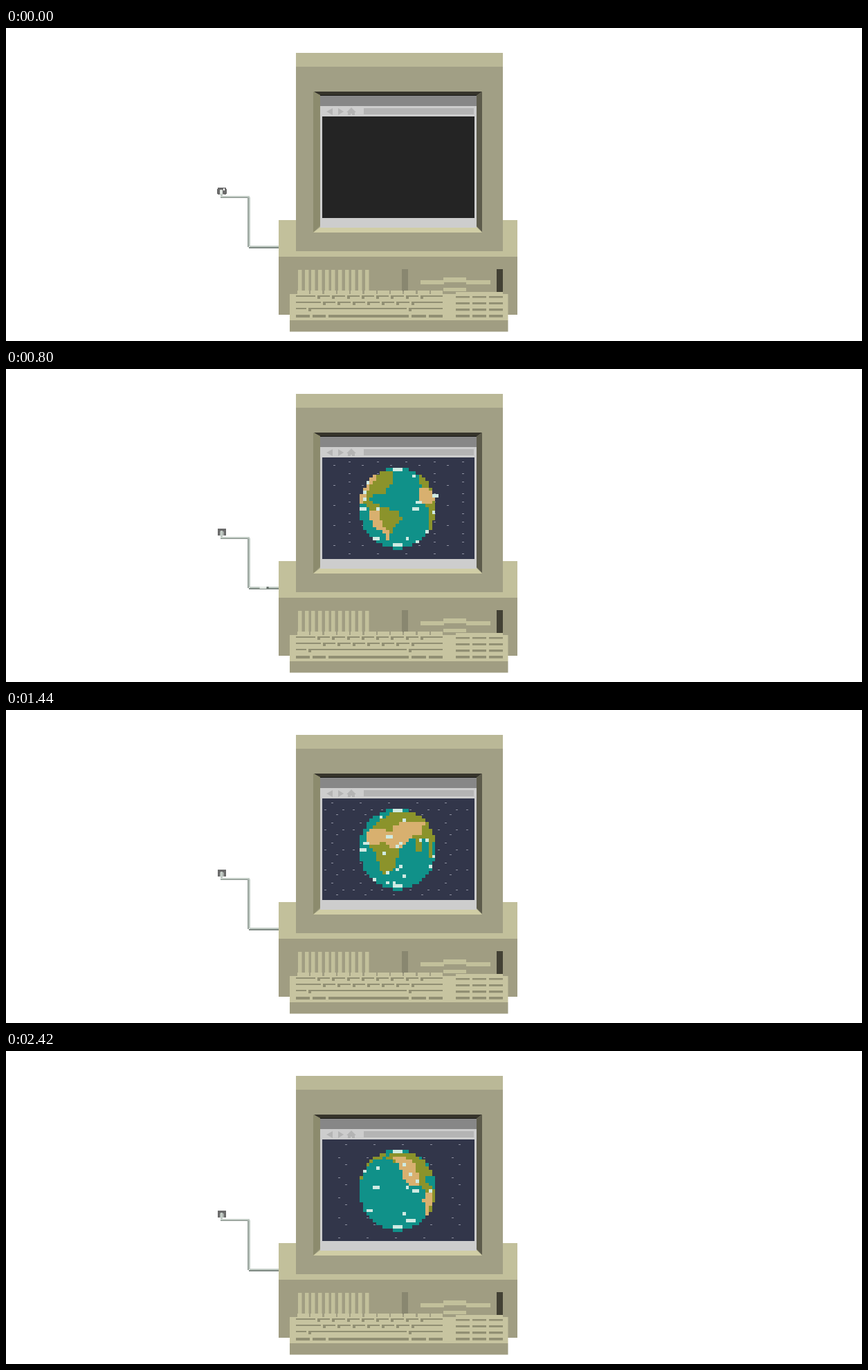
These frames come from a looping animation (1237 by 453 pixels, 2.44 s). An HTML page with a canvas:

```html
<!DOCTYPE html>
<html>
<head>
<meta charset="utf-8">
<style>
html, body { margin: 0; width: 100%; height: 100%; overflow: hidden; background: #fff; }
canvas { display: block; }
</style>
</head>
<body>
<canvas id="stage" width="1237" height="453"></canvas>
<script>
const ctx = document.getElementById('stage').getContext('2d');
const LOOP = 2440, LOADED = 911, TURN = 23, STEP = 650 / TURN;
const CELL = 4.75, GX = 511.2, GY = 138.3, RAD = Math.PI / 180;

// Corner-based rectangle and polygon
function box(color, x1, y1, x2, y2) {
  ctx.fillStyle = color;
  ctx.fillRect(x1, y1, x2 - x1, y2 - y1);
}
function poly(color, points) {
  ctx.fillStyle = color;
  ctx.fill(new Path2D('M' + points + 'z'));
}

// Coastlines as longitude in degrees and globe row
const coast = points => new Path2D('M' + points + 'z');
const oldLand = coast('-49,5 -36,4 -27,2.5 60,2 140,2 135,3.5 95,4 100,8 85,11 66,11 67,16 56,16 58,9.5 42,10 40,14 28,14 29,10 18,10 3,13 2,15.5 -9,20 -16,21 -30,21 -33,16 -40,13 -55,12 -60,9 -45,6');
const oldSand = coast('10,5 70,5 48,7 43,9 30,9 18,10 12,12 2,13 -8,13 -23,11 -34,12 -55,12 -60,9 -56,7 -20,7 -19,8 -8,8 -9,6');
const newLand = coast('-212,2 -113,2 -104,5 -118,9.5 -130,9 -143,10.5 -128,12 -117,13 -96,14 -87,16 -91,18 -104,20 -112,23 -122,21 -135,19 -143,16.5 -137,13 -158,12 -166,12 -176,10 -182,6 -200,4 -215,4');
const newSand = coast('-200,3 -185,3 -150,4 -153,7 -156,12 -166,12 -176,10 -182,9 -182,6 -192,5z' +
  'M-136,14 -123,14 -119,18 -106,22 -116,23 -122,21 -135,19 -143,16.5');
const layers = [
  ['#d8b06f', oldSand], ['#d8b06f', newSand], ['#8b932b', oldLand], ['#8b932b', newLand]
];

let seed = 11;
const random = () => (seed = seed * 16807 % 2147483647) / 2147483647;
const clouds = Array.from({ length: 34 }, () => ({
  lon: random() * 360, row: 3 + Math.floor(random() * 21), size: random() < 0.3 ? 2 : 1
}));

const halfWidth = row => 11.7 * Math.sqrt(Math.max(0, 1 - ((row - 12.8) / 12.3) ** 2));

function surface(lon, y) {
  const x = ((lon + 215) % 360 + 360) % 360 - 215;
  const hit = layers.find(([, path]) => ctx.isPointInPath(path, x, y));
  return hit ? hit[0] : '#109189';
}

function cell(color, col, row, size = 1) {
  box(color, Math.round(GX + col * CELL), Math.round(GY + row * CELL),
    Math.round(GX + (col + size) * CELL), Math.round(GY + (row + 1) * CELL));
}

function drawGlobe(center, limit) {
  const rows = Math.min(26, Math.floor((limit - GY) / CELL));
  const white = '#cfeae2';
  for (let row = 1; row < rows; row++) {
    const half = halfWidth(row);
    for (let col = 0; col < 23; col++) {
      const dx = col - 11;
      if (Math.abs(dx) > half) continue;
      const polar = (row === 1 || row === 24) && Math.abs(dx) < 2;
      const lon = center + Math.asin(dx / half) / RAD;
      cell(polar ? white : surface(lon, row + 0.5), col, row);
    }
  }
  for (const { lon, row, size } of clouds) {
    const a = (lon - center) * RAD;
    if (row < rows && Math.cos(a) > 0.2)
      cell(white, Math.round(11 + halfWidth(row) * Math.sin(a)), row, size);
  }
}

// Twinkling star tiles, 41 by 29 pixels
const skies = [
  [[471, 134], [461, 144], [487, 144], [478, 151]],
  [[474, 139], [496, 134], [496, 151]],
  [[491, 135], [481, 154]]
];

function drawSky(step) {
  box('#32364a', 457, 128, 677, 275);
  const phase = (step % TURN + TURN) % TURN;
  for (const [x0, y0] of skies[Math.round(phase / 6) % 4 % 3])
    for (let y = y0; y < 273; y += 29)
      for (let x = x0; x < 676; x += 41) box('#8d90a0', x - 1, y, x + 2, y + 1);
}

function drawCable(t) {
  const light = '#c3cdc6', dark = '#7f8a83';
  box('#6b6b6b', 306, 231, 318, 241);
  box('#a5aaa7', 309, 235, 315, 241);
  box(light, 310, 234, 313, 245);
  box(light, 310, 243, 352, 245);
  box(dark, 310, 245, 350, 246);
  box('#9ba69f', 349, 245, 351, 317);
  box(light, 351, 245, 353, 316);
  box(light, 352, 315, 394, 317);
  box(dark, 351, 317, 394, 319);
  if (t >= LOADED) return;

  // A pulse runs from the plug to the computer
  const d = t * 0.178, glow = '#e3e9e4', shade = '#66706a';
  if (d < 8) {
    box('#6b6b6b', 305, 233, 319, 240);
    box('#fff', 314, 232 + d, 316, 235 + d);
    box(glow, 309, 234 + d, 313, 240 + d);
  } else if (d >= 47 && d < 119) {
    const y = 197 + d;
    box(glow, 349, y - 6, 353, y + 4);
    box(shade, 349, y + 4, 353, y + 7);
  } else {
    const [x, y] = d < 47 ? [303 + d, 243] : [231 + d, 315];
    box(glow, x - 7, y, x + 3, y + 3);
    box(shade, x + 3, y, x + 6, y + 3);
  }
}

function drawKeyboard() {
  const key = '#c7c4a0', gap = '#918f73';
  box(key, 410, 385, 725.5, 423);
  box('#a09d82', 410, 423, 725.5, 439.5);
  for (let i = 0; i < 11; i++) box(key, Math.round(421 + i * 19.3), 380, Math.round(438 + i * 19.3), 386);
  box(key, 650, 382, 718, 386);

  // Gaps between key rows, with short stems between the keys
  for (let i = 0; i < 3; i++) {
    const y = 387 + i * 9, pitch = i < 2 ? 21.3 : 145;
    box(gap, 419, y, 631, y + 2);
    for (let x = [450, 458, 437][i]; x < 605; x += pitch) {
      box(gap, Math.round(x), y + 1, Math.round(x) + 4, y + 5);
      box(key, Math.round(x) - 3, y, Math.round(x), y + 2);
    }
  }
  box(gap, 419, 415, 631, 419);
  for (const x of [439, 462, 582, 607]) box(key, x, 415, x + 4, 419);
  for (let col = 0; col < 3; col++)
    for (let row = 0; row < 4; row++)
      box(gap, 650 + col * 24, 388 + row * 9, 670 + col * 24, 390.5 + row * 9.4);
}

function drawComputer() {
  const pale = '#c2c09b', front = '#a09d82';
  box(pale, 394, 278, 739, 331);
  box(front, 394, 331, 739, 415);
  box('#bab897', 419, 36, 718, 56);
  box('#a19f85', 419, 56, 718, 323);
  poly('#36342b', '445,92 688,92 680,98 454,98');
  poly('#8c8b6d', '444,92 454,97 454,286 444,296');
  poly('#5d5b4b', '688,92 680,98 680,287 688,295');
  poly('#d0cda5', '444,296 454,288 680,288 688,296');

  box('#cdcdcd', 454, 98, 680, 289);
  box('#878787', 454, 98, 680, 113);
  box('#151512', 454, 97, 680, 98);
  const icon = '#b4b4b4';
  box(icon, 517, 116, 676, 125);
  poly(icon, '463,121 472,116 472,126');
  poly(icon, '480,116 488,121 480,126');
  poly(icon, '499,115 506,122 504,122 504,126 500,126 500,124 498,124 498,126 494,126 494,122 492,122');
  box('#242424', 457, 128, 677, 275);

  for (let i = 0; i < 11; i++) {
    const x = Math.round(422 + i * 9.65);
    box(pale, x, 350, x + 5.5, 381);
  }
  box('#898770', 572, 349, 581, 381);
  box('#424034', 709, 349, 718, 382);
  box(pale, 599, 365, 700, 371);
  box(front, 633, 368, 665, 371);
  box(pale, 632, 361, 665, 368);
  box(pale, 632, 376, 665, 381);
  drawKeyboard();
}

function draw(now) {
  const t = now % LOOP;
  ctx.clearRect(0, 0, 1237, 453);
  drawCable(t);
  drawComputer();
  if (t >= 20) {
    // The globe stands still until it is fully loaded
    const step = Math.max(6 - TURN, Math.floor((t - 1418) / STEP));
    drawSky(step);
    drawGlobe(-step * 360 / TURN, 133 + t / 6);
  }
  requestAnimationFrame(draw);
}
draw(0);
</script>
</body>
</html>
```
